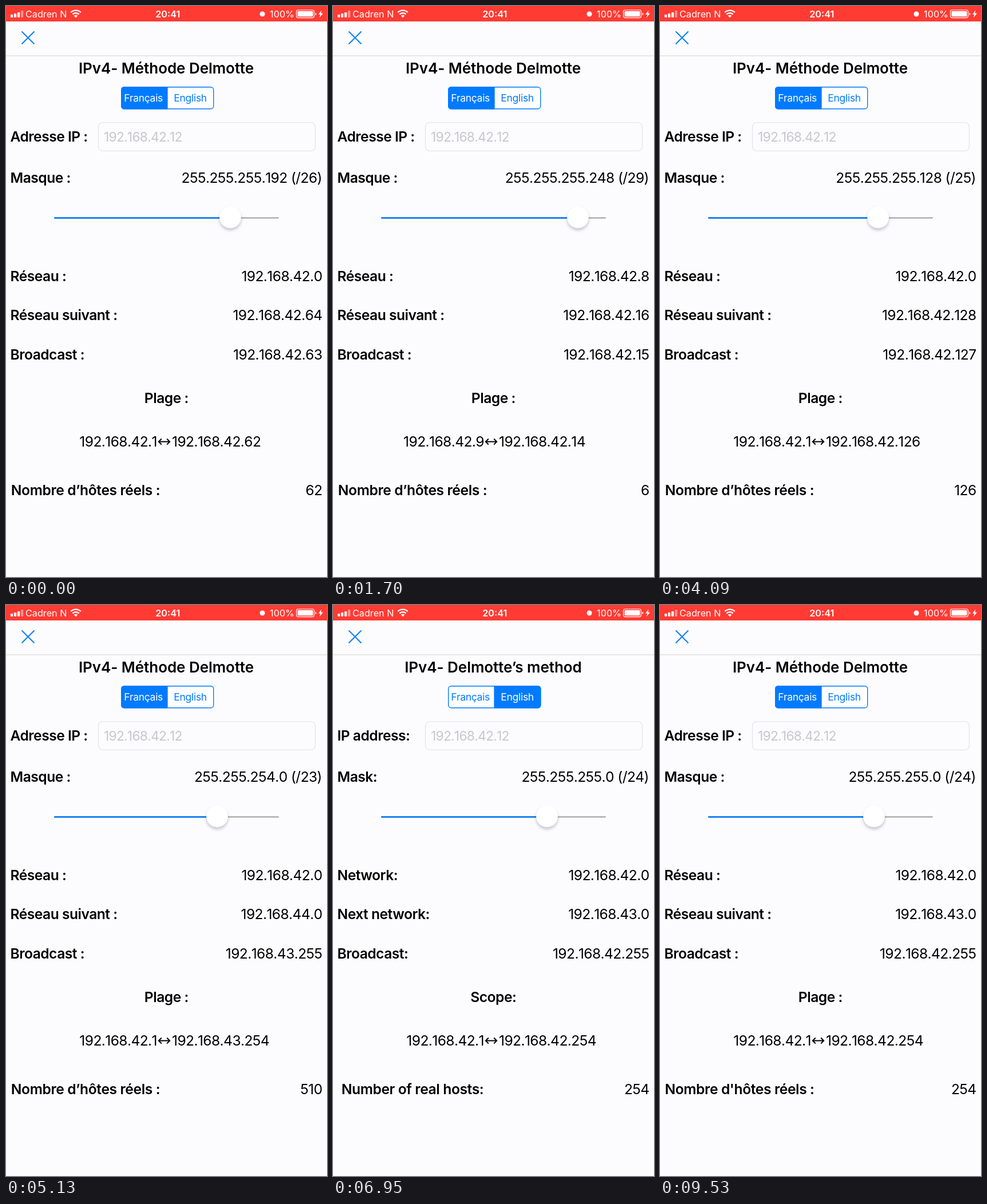
An HTML page for the animation above (9.55 s loop, 561 by 998 pixels).

```html
<!DOCTYPE html>
<html lang="fr">
<head>
<meta charset="utf-8">
<title>IPv4</title>
<style>
  html, body { margin: 0; width: 100%; height: 100%; overflow: hidden; background: #fcfcff; }
  svg { display: block; }
  text { font: 400 24.6px Inter, "Liberation Sans", sans-serif; font-kerning: none; letter-spacing: -.6px; font-optical-sizing: none; }
  .label { font-weight: 600; font-kerning: normal; letter-spacing: -.5px; }
  .loose { letter-spacing: -.38px; }
  .title { font-weight: 600; font-size: 26px; font-kerning: normal; letter-spacing: -.05px; }
  .hint { font-size: 23px; letter-spacing: -.85px; fill: #c8c8cd; }
  .tab { font-size: 17.5px; font-kerning: normal; letter-spacing: -.3px; }
  .status { font-size: 16.2px; font-kerning: normal; letter-spacing: 0; fill: #fff; }
  .bold { font-weight: 600; }
  .end { text-anchor: end; }
  .mid { text-anchor: middle; }
</style>
</head>
<body>
<svg width="561" height="998" viewBox="0 0 561 998">
  <defs>
    <filter id="shadow" x="-50%" y="-50%" width="200%" height="200%">
      <feDropShadow dx="0" dy="3.5" stdDeviation="2.8" flood-color="#223" flood-opacity=".26"/>
    </filter>
    <clipPath id="tabs"><rect x="201" y="141" width="162.5" height="39.5" rx="5.5"/></clipPath>
  </defs>

  <rect width="561" height="998" fill="#fcfcff"/>
  <rect width="561" height="27" fill="#ff3b33"/>
  <path d="M0 87H561" stroke="#e2e2d8" stroke-width="1.3"/>

  <!-- status bar -->
  <g fill="#fff">
    <rect x="8" y="15" width="4.2" height="5" rx="1"/>
    <rect x="14" y="13" width="4.2" height="7" rx="1"/>
    <rect x="20" y="11" width="4.2" height="9" rx="1"/>
    <rect x="26" y="8" width="4.2" height="12" rx="1" opacity=".45"/>
    <path d="M122 20.5l-3.2-3.4a4.6 4.6 0 0 1 6.4 0z"/>
    <circle cx="448" cy="14" r="4.5"/>
    <rect x="509.5" y="9" width="27" height="9.6" rx="1.5"/>
    <path d="M540.5 11.5a2.6 2.6 0 0 1 0 5z"/>
    <path d="M551.5 7.5L546 14.8H549.4L547.8 20.5L554 12.8H550.4z"/>
  </g>
  <g fill="none" stroke="#fff">
    <path d="M113.3 11.2a12.4 12.4 0 0 1 17.4 0M116.4 14.6a8 8 0 0 1 11.2 0" stroke-width="2.4"/>
    <rect x="507.5" y="7" width="31" height="13.6" rx="3" stroke-width="1.1"/>
  </g>
  <text class="status" x="34" y="20">Cadren N</text>
  <text class="status bold mid" x="282.8" y="20">20:41</text>
  <text class="status end" x="504" y="20">100%</text>

  <path d="M27.5 44.5l22 22m0-22l-22 22" stroke="#0f82f2" stroke-width="2.1"/>

  <text id="title" class="title mid" x="280" y="118"></text>

  <g clip-path="url(#tabs)">
    <rect id="tabFr" x="201" y="141" width="81" height="40"/>
    <rect id="tabEn" x="282" y="141" width="82" height="40"/>
  </g>
  <rect x="201.7" y="141.7" width="161" height="38" rx="4.8" fill="none" stroke="#007aff" stroke-width="1.4"/>
  <path d="M282 141.5V180" stroke="#007aff" stroke-width="1.3"/>
  <text id="textFr" class="tab mid" x="240.2" y="167">Français</text>
  <text id="textEn" class="tab mid" x="322.1" y="167">English</text>

  <text id="address" class="label" x="7.5" y="237"></text>
  <rect x="161.5" y="203.7" width="379" height="49.6" rx="7.5" fill="none" stroke="#e1e1e2" stroke-width="1.1"/>
  <text class="hint" x="171" y="237">192.168.42.12</text>

  <text id="maskLabel" class="label" x="7.5" y="309"></text>
  <text id="mask" class="end" x="552" y="309"></text>

  <rect x="84" y="369" width="393" height="2.8" rx="1.4" fill="#b5b5b7"/>
  <rect id="filled" x="84" y="369" height="2.8" rx="1.4" fill="#0b80f5"/>
  <circle id="thumb" cy="369.4" r="18.8" fill="#fff" filter="url(#shadow)"/>

  <text id="netLabel" class="label" x="7.5" y="481"></text>
  <text id="net" class="end" x="552.6" y="481"></text>
  <text id="nextLabel" class="label" x="7.5" y="549"></text>
  <text id="next" class="end" x="552.6" y="549"></text>
  <text id="castLabel" class="label" x="7.5" y="618"></text>
  <text id="cast" class="end" x="552.6" y="618"></text>
  <text id="rangeLabel" class="label mid" x="280.3" y="694"></text>

  <text id="first" class="end" x="264" y="770"></text>
  <path d="M267 761.5H286M271.8 756.5L266.8 761.5L271.8 766.5M281.2 756.5L286.2 761.5L281.2 766.5" fill="none" stroke="#000" stroke-width="1.9"/>
  <text id="last" x="290" y="770"></text>

  <text id="hostsLabel" class="label loose mid" x="139" y="855"></text>
  <text id="hosts" class="end" x="552.6" y="855"></text>
</svg>

<script>
const LOOP = 9550, FADE = 200;
const TO_ENGLISH = { press: 6320, release: 6425 };
const TO_FRENCH = { press: 8920, release: 9025 };
const IP = [192, 168, 42, 12].reduce((sum, part) => sum * 256 + part);

// [time, thumb centre]
const DRAG = [[0, 392], [1700, 428], [3230, 390.5], [5130, 369], [5720, 374]];

const FRENCH = {
  title: "IPv4- Méthode Delmotte", address: "Adresse IP :", maskLabel: "Masque :",
  netLabel: "Réseau :", nextLabel: "Réseau suivant :", castLabel: "Broadcast :",
  rangeLabel: "Plage :", hostsLabel: "Nombre d’hôtes réels :"
};
const FRENCH_AGAIN = { ...FRENCH, hostsLabel: "Nombre d'hôtes réels :" };
const ENGLISH = {
  title: "IPv4- Delmotte’s method", address: "IP address:", maskLabel: "Mask:",
  netLabel: "Network:", nextLabel: "Next network:", castLabel: "Broadcast:",
  rangeLabel: "Scope:", hostsLabel: "Number of real hosts:"
};

const el = id => document.getElementById(id);
const clamp = v => Math.min(1, Math.max(0, v));
const dotted = n => [24, 16, 8, 0].map(s => Math.floor(n / 2 ** s) % 256).join(".");
const blue = k => `rgb(${255 - 255 * k},${255 - 133 * k},255)`;

function write(values) {
  for (const id in values) {
    if (el(id).textContent !== values[id]) el(id).textContent = values[id];
  }
}

function thumbAt(t) {
  const i = DRAG.findIndex(point => point[0] > t);
  if (i < 0) return DRAG[DRAG.length - 1][1];
  const [t0, x0] = DRAG[i - 1], [t1, x1] = DRAG[i];
  const p = (t - t0) / (t1 - t0);
  return x0 + (x1 - x0) * p * p * (3 - 2 * p);
}

function subnet(bits) {
  const size = 2 ** (32 - bits);
  const net = Math.floor(IP / size) * size;
  return {
    mask: `${dotted(2 ** 32 - size)} (/${bits})`,
    net: dotted(net),
    next: dotted(net + size),
    cast: dotted(net + size - 1),
    first: dotted(net + 1),
    last: dotted(net + size - 2),
    hosts: String(size - 2)
  };
}

function paintTab(name, selected, pressed) {
  const tint = pressed ? .15 : 0;
  el("tab" + name).setAttribute("fill", blue(tint + (1 - tint) * selected));
  el("text" + name).setAttribute("fill", blue(1 - selected));
}

function draw(t) {
  const x = thumbAt(t);
  el("thumb").setAttribute("cx", x);
  el("filled").setAttribute("width", x - 84);
  write(subnet(Math.floor((x - 102.5) / 356 * 32)));

  write(t < TO_ENGLISH.release ? FRENCH : t < TO_FRENCH.release ? ENGLISH : FRENCH_AGAIN);
  const english = clamp((t - TO_ENGLISH.release) / FADE) - clamp((t - TO_FRENCH.release) / FADE);
  paintTab("Fr", 1 - english, t >= TO_FRENCH.press);
  paintTab("En", english, t >= TO_ENGLISH.press && t < TO_FRENCH.press);
}

const start = performance.now();
function tick() {
  draw((performance.now() - start) % LOOP);
  requestAnimationFrame(tick);
}
tick();
</script>
</body>
</html>
```
